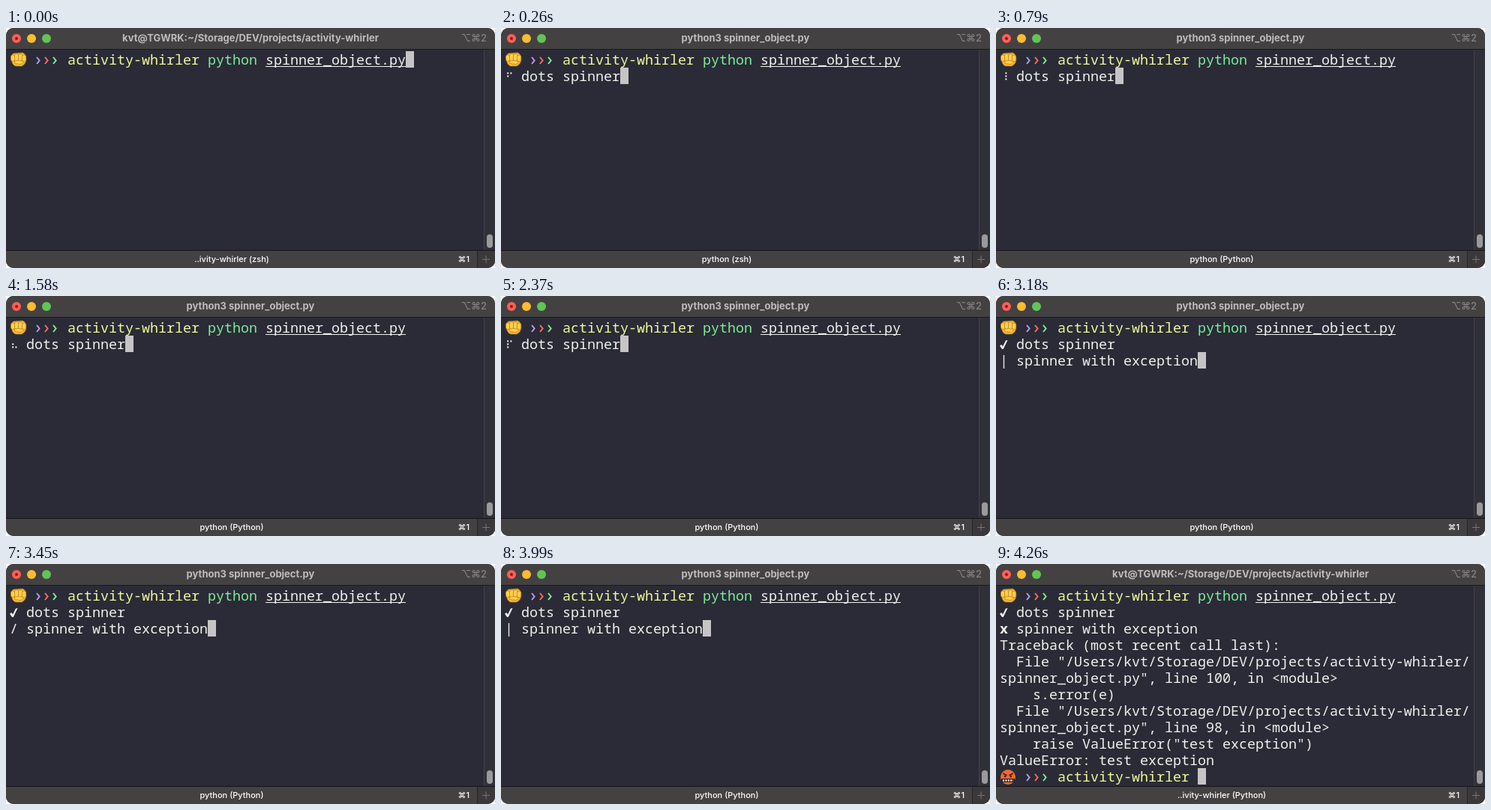
Animation of 652 by 321 pixels, one loop 7530 ms. Source, as an HTML page:

```html
<!DOCTYPE html>
<html lang="en">
<head>
<meta charset="utf-8">
<title>Terminal spinner</title>
<style>
  html, body { margin: 0; width: 100%; height: 100%; overflow: hidden; background: #fff; }
  svg { display: block; width: 652px; height: 321px; }
  text { white-space: pre; }
  .mono { font: 18.333px "Noto Sans Mono", "DejaVu Sans Mono", monospace; fill: #f0f0ee; }
  .ui { font-family: Inter, "Open Sans", "DejaVu Sans", sans-serif; }
  .title { font-size: 13px; font-weight: 700; fill: #bebcbe; }
  .hint { font-size: 13px; font-weight: 500; fill: #858385; }
  .tab { font-size: 11px; font-weight: 500; fill: #fff; }
</style>
</head>
<body>
<svg viewBox="0 0 652 321">
  <defs>
    <clipPath id="window"><rect width="652" height="321" rx="10"/></clipPath>
    <g id="fist" stroke="#b9781c" stroke-width=".7">
      <path d="M7 41Q6 36 10 34L22 33Q27 35 27 41Q27 48 21 51H13Q8 50 7 41Z" fill="#f7bd37"/>
      <rect x="6.5" y="36" width="5.3" height="8.5" rx="2.4" fill="#ffd04a"/>
      <rect x="11.5" y="34.5" width="5.3" height="10" rx="2.4" fill="#ffd04a"/>
      <rect x="16.5" y="34.5" width="5.3" height="10" rx="2.4" fill="#ffd04a"/>
      <rect x="21.5" y="36" width="5" height="9" rx="2.4" fill="#ffd04a"/>
      <path d="M11 44.5Q16 42 23 44.5Q24 48 19 48.5L12 47.5Z" fill="#ffd04a"/>
    </g>
    <g id="angry">
      <circle cx="16" cy="285" r="10" fill="#ee6a35"/>
      <path d="M9 280L14.5 282.5M23 280L17.5 282.5" stroke="#5c1c10" stroke-width="1.5"/>
      <circle cx="12.3" cy="284" r="1.4" fill="#4a170d"/>
      <circle cx="19.7" cy="284" r="1.4" fill="#4a170d"/>
      <rect x="7" y="287" width="18" height="5" rx="1" fill="#29272a"/>
      <path d="M9 289.5H23" stroke="#f4f0ee" stroke-width="2.4" stroke-dasharray="2 1.4"/>
    </g>
  </defs>
  <g clip-path="url(#window)">
    <rect width="652" height="321" fill="#2a2b36"/>
    <rect width="652" height="28" fill="#444143"/>
    <rect y="28" width="652" height="1" fill="#1a191c"/>
    <circle cx="14" cy="14" r="6" fill="#ff5f57"/>
    <circle cx="14" cy="14" r="2" fill="#8c1a13"/>
    <circle cx="34" cy="14" r="6" fill="#febc2e"/>
    <circle cx="54" cy="14" r="6" fill="#61c554"/>
    <rect x="637" y="29" width="15" height="268" fill="#303138"/>
    <rect x="637" y="29" width="1" height="268" fill="#42434a"/>
    <rect x="641" y="276" width="8" height="18" rx="4" fill="#9a9a9d"/>
    <rect y="297" width="652" height="24" fill="#444143"/>
    <rect y="297" width="652" height="1" fill="#151416"/>
    <rect x="629" y="298" width="23" height="23" fill="#3a383a"/>
    <rect x="628" y="298" width="1" height="23" fill="#252426"/>
    <path d="M635 309.5H645M640 304.5V314.5" stroke="#777577"/>
    <text class="ui hint" x="641" y="17.5" text-anchor="end">⌥⌘2</text>
    <text class="ui tab" x="618" y="313" text-anchor="end">⌘1</text>
    <text class="ui title" id="title" x="326" y="18" text-anchor="middle"></text>
    <text class="ui tab" id="tab" x="301" y="313" text-anchor="middle"></text>
    <g class="mono" id="screen"></g>
  </g>
</svg>
<script>
const LOOP = 7530;
const CHANGES = [260, 520, 790, 1050, 1310, 1580, 1840, 2100, 2370,
                 2640, 2910, 3180, 3450, 3720, 3990, 4260];
const DOTS = '⠋⠹⠸⠼⠴⠦⠧⠇⠏';
const LINES = '-\\|/-|';
const FIRST_LINE = DOTS.length + 1;
const FINISHED = CHANGES.length;

const PROJECT = 'activity-whirler';
const HOME_TITLE = `kvt@TGWRK:~/Storage/DEV/projects/${PROJECT}`;
const FILE_LINE = `  File "/Users/kvt/Storage/DEV/projects/${PROJECT}/`;
const TRACEBACK = [
  'Traceback (most recent call last):',
  FILE_LINE,
  'spinner_object.py", line 100, in <module>',
  '    s.error(e)',
  FILE_LINE,
  'spinner_object.py", line 98, in <module>',
  '    raise ValueError("test exception")',
  'ValueError: test exception'
];

const byId = id => document.getElementById(id);
const colX = col => 5 + col * 11;
const rowY = row => 31 + row * 22;
const escapeText = s => s.replace(/&/g, '&amp;').replace(/</g, '&lt;');

const write = (col, row, s, attrs = '') =>
  `<text x="${colX(col)}" y="${rowY(row) + 18}" ${attrs}>${escapeText(s)}</text>`;

const cursor = (col, row) =>
  `<rect x="${colX(col)}" y="${rowY(row)}" width="11" height="22" fill="#c7c4c6"/>`;

function prompt(row, emoji) {
  const chevrons = ['#b79af5', '#ff6a67', '#7eeb98'].map((color, i) =>
    `<path d="M${41 + i * 11} ${rowY(row) + 8}l3.6 4.5l-3.6 4.5" fill="none" stroke="${color}" stroke-width="2"/>`);
  return `<use href="#${emoji}"/>` + chevrons.join('') + write(7, row, PROJECT, 'fill="#f1f79a"');
}

// Braille bits 0-2 are the left column from the top, bits 3-5 the right.
function braille(char, row) {
  const bits = char.charCodeAt(0) - 0x2800;
  let out = '';
  for (let i = 0; i < 6; i++) {
    if (bits >> i & 1) {
      const x = i < 3 ? 9.2 : 13.4;
      out += `<circle cx="${x}" cy="${rowY(row) + 29.5 - 22 + i % 3 * 4}" r="1.15"/>`;
    }
  }
  return out;
}

function screen(step) {
  let out = prompt(0, 'fist') + write(24, 0, 'python', 'fill="#7eeb98"')
    + write(31, 0, 'spinner_object.py')
    + '<rect x="346" y="51" width="187" height="1"/>';
  if (step === 0) return out + cursor(48, 0);

  out += write(2, 1, 'dots spinner');
  if (step < FIRST_LINE) return out + braille(DOTS[step - 1], 1) + cursor(14, 1);

  out += '<path d="M5 66.5L7.5 65L9 67.5L13 59.5L15.5 59L9.8 71H8Z"/>'
    + write(2, 2, 'spinner with exception');
  if (step < FINISHED) return out + write(0, 2, LINES[step - FIRST_LINE]) + cursor(24, 2);

  return out + write(0, 2, 'x', 'font-weight="700"')
    + TRACEBACK.map((line, i) => write(0, i + 3, line)).join('')
    + prompt(11, 'angry') + cursor(24, 11);
}

function render(step) {
  const idle = step === 0 || step === FINISHED;
  const process = step < 2 ? 'zsh' : 'Python';
  byId('title').textContent = idle ? HOME_TITLE : 'python3 spinner_object.py';
  byId('tab').textContent = `${idle ? '..' + PROJECT.slice(-13) : 'python'} (${process})`;
  byId('screen').innerHTML = screen(step);
}

let shown = -1;
const start = performance.now();
function tick() {
  const time = (performance.now() - start) % LOOP;
  const step = CHANGES.filter(change => change <= time).length;
  if (step !== shown) render(shown = step);
  requestAnimationFrame(tick);
}
tick();
</script>
</body>
</html>
```
